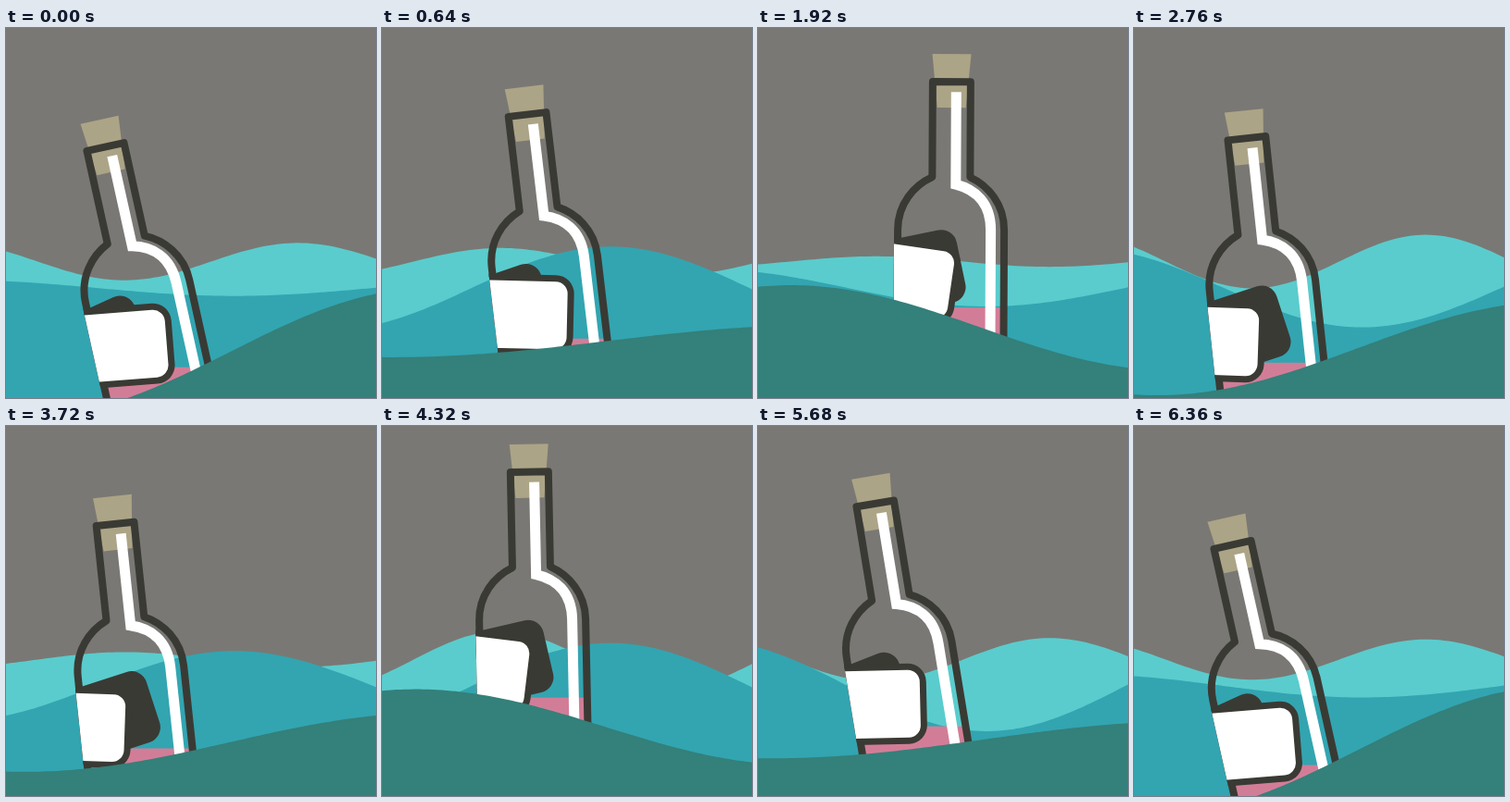
An HTML page that plays this animation: 400x400 px, repeating every 6.4 s.

```html
<!DOCTYPE html>
<html>
<head>
<meta charset="utf-8">
<title>Bottle at sea</title>
<style>
  html, body { margin: 0; width: 100%; height: 100%; overflow: hidden; background: #7a7874; }
  svg { display: block; width: 100%; height: 100%; }
  .ink { fill: #3a3a34; }
</style>
</head>
<body>
<svg viewBox="0 0 400 400">
  <defs>
    <path id="glass" d="M-20.5 0H20.5V103C40 112 57.5 132 57.5 160V310H-57.5V160C-57.5 132 -40 112 -20.5 103Z"/>
    <clipPath id="inside"><use href="#glass"/></clipPath>
    <clipPath id="edge"><rect x="-61.5" y="100" width="123" height="220"/></clipPath>
  </defs>
  <path id="light" fill="#5acccd"/>
  <path id="mid" fill="#32a5b1"/>
  <g id="bottle">
    <path fill="#aca486" d="M-21 -30H21L15.5 28H-15.5Z"/>
    <g clip-path="url(#inside)">
      <rect id="wine" x="-120" y="244" width="240" height="120" fill="#d27d97"/>
    </g>
    <g clip-path="url(#edge)">
      <g id="back"><rect class="ink" x="-140" y="-40" width="140" height="80" rx="17"/></g>
    </g>
    <use href="#glass" fill="none" stroke="#3a3a34" stroke-width="8" stroke-linejoin="round"/>
    <path fill="none" stroke="#fff" stroke-width="11" d="M5 11V111C25 116 43 130 43 160V310"/>
    <g clip-path="url(#edge)">
      <g id="front">
        <rect class="ink" x="-147" y="-43.5" width="154" height="87" rx="20"/>
        <rect fill="#fff" x="-140" y="-36.5" width="140" height="73" rx="13"/>
      </g>
    </g>
  </g>
  <path id="dark" fill="#34807a"/>
</svg>
<script>
const LOOP = 6400, SWELL = LOOP / 2;
const el = id => document.getElementById(id);
const place = (id, x, y, turn) =>
  el(id).setAttribute("transform", `translate(${x} ${y}) rotate(${turn})`);

// Cosine that tops out at the given peak
const swing = (at, peak, period) => Math.cos(2 * Math.PI * (at - peak) / period);

// Mean plus harmonics of the loop, each an [amplitude, peak time]
const drift = (t, mean, ...harmonics) => harmonics.reduce(
  (sum, [size, peak], i) => sum + size * swing(t, peak, LOOP / (i + 1)), mean);

// Standing wave: a fixed curve whose height rises and falls
function drawWave(id, size, curve) {
  let d = "M0 401";
  for (let x = 0; x <= 400; x += 5) d += `L${x} ${(curve(x, size)).toFixed(2)}`;
  el(id).setAttribute("d", d + "V401Z");
}

function draw() {
  const t = performance.now() % LOOP;

  drawWave("light", 30 * swing(t, 2800, SWELL) - 1, (x, size) => 252.5 + size * swing(x, 128, 375));
  drawWave("mid", 50 * swing(t, 2500, SWELL) - 1, (x, size) => 281 + size * swing(x, 247, 600));
  drawWave("dark", swing(t, 3150, SWELL),
    (x, size) => 339 - x * .015 + size * (15 + 66 * swing(x, 30, 847)));

  const x = drift(t, 151.1, [24.8, 1461], [47.3, 1543], [1.9, 1600]);
  const y = drift(t, 82.3, [9.1, 2050], [47.2, -26], [3.5, -189]);
  const tilt = drift(t, -5, [2.5, 2749], [5.3, 1528], [.4, 533]);
  place("bottle", x, y, tilt);
  el("wine").setAttribute("transform", `rotate(${-tilt} 0 244)`);

  // The two labels slide around the glass in opposite directions
  const slide = swing(t, 178, LOOP);
  place("front", 2.5 + 16.5 * slide, 221, 8);
  place("back", 9.5 - 11.5 * slide, 196, -12);
  requestAnimationFrame(draw);
}
draw();
</script>
</body>
</html>
```
